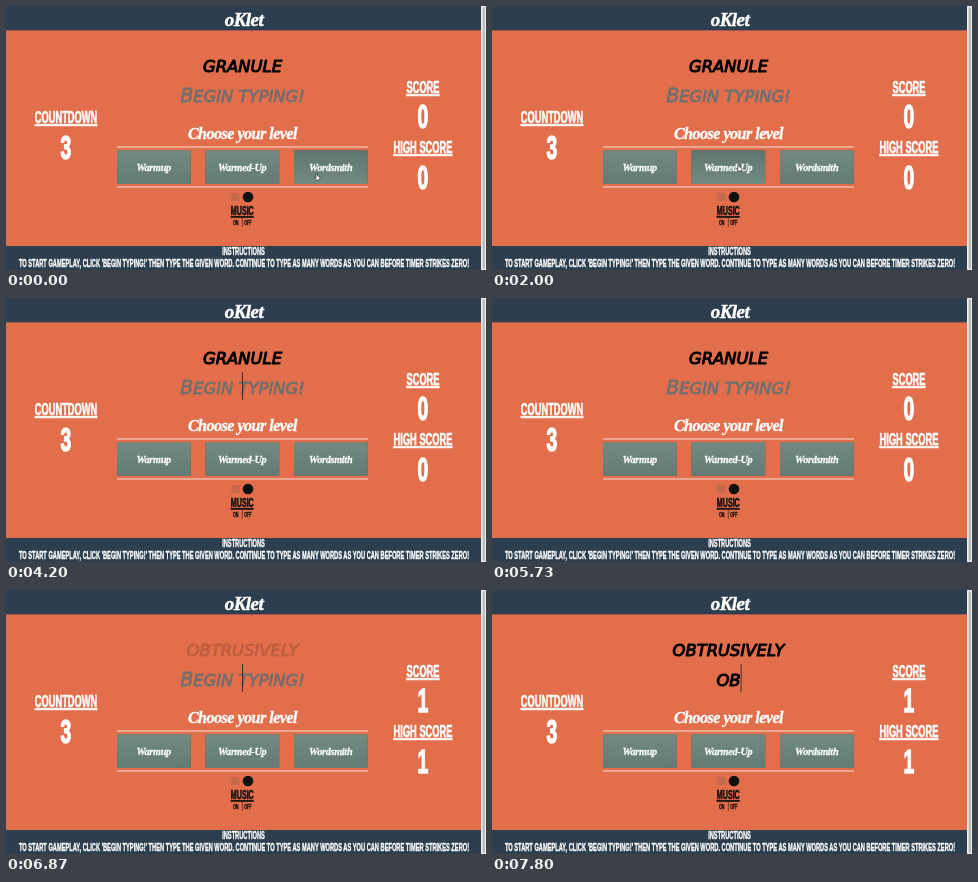
Animation of 480x264 px, one loop 8 s. Source, as an HTML page:

```html
<!DOCTYPE html>
<html lang="en">
<head>
<meta charset="utf-8">
<title>Typing game</title>
<style>
  html, body { margin: 0; width: 100%; height: 100%; overflow: hidden; background: #e36e4b; }
  svg { display: block; width: 100vw; height: 100vh; }
  text { text-anchor: middle; fill: #fff; stroke: #fff; }
  .caps { font-family: "Liberation Sans", Arial, sans-serif; font-weight: bold; stroke-width: .045em; }
  .script { font-family: "Liberation Serif", Times, serif; font-weight: bold; font-style: italic; letter-spacing: -.03em; stroke-width: .025em; }
  .marker { font: italic 16.4px "DejaVu Sans", sans-serif; fill: #000; stroke: #000; stroke-width: 1.05; stroke-linejoin: round; }
  .hint { fill: #716f6f; stroke: #716f6f; stroke-width: .8; }
  .under { text-decoration: underline; }
  .dark { fill: #0d0d0d; stroke: #0d0d0d; }
  .button { filter: drop-shadow(0 .6px .7px #0006); }
</style>
</head>
<body>
<svg id="stage" viewBox="0 0 480 264" preserveAspectRatio="none">
  <defs>
    <linearGradient id="idle" x2="0" y2="1">
      <stop stop-color="#728a80"/><stop offset="1" stop-color="#637b75"/>
    </linearGradient>
    <linearGradient id="hover" x2="0" y2="1">
      <stop stop-color="#5e7670"/><stop offset="1" stop-color="#728a80"/>
    </linearGradient>
  </defs>
  <rect width="480" height="264" fill="#e36e4b"/>
  <rect width="480" height="24.4" fill="#2d3e4e"/>
  <rect y="240" width="480" height="24" fill="#2d3e4e"/>
  <rect x="475" width="5" height="264" fill="#eeeeee"/>
  <rect x="476.500" y="1" width="2.500" height="262" rx="1.200" fill="#bdbdbd"/>
  <path d="M111 141h251M111 181h251" stroke="#f8ddd4"/>
  <rect x="225.5" y="187" width="8" height="8" fill="#c4694c"/>
  <circle cx="242" cy="191" r="5.3" fill="#111"/>
  <path d="M236.3 212v9" stroke="#3a241e" stroke-width=".7"/>
</svg>
<script>
const LOOP = 8000;
const CONDENSED = 0.57;
const CENTER = 236.5;
const stage = document.getElementById("stage");

function add(tag, attrs, content = "") {
  const node = document.createElementNS("http://www.w3.org/2000/svg", tag);
  for (const key in attrs) node.setAttribute(key, attrs[key]);
  node.textContent = content;
  stage.append(node);
  return node;
}
const caps = (content, x, y, size, style = "") => add("text", {
  class: "caps " + style, "font-size": size,
  transform: `translate(${x} ${y}) scale(${CONDENSED} 1)`
}, content);
const script = (content, x, y, size) =>
  add("text", { class: "script", x, y, "font-size": size }, content);
const marker = (y, style = "") =>
  add("text", { class: "marker " + style, x: CENTER, y });

script("oKlet", 238, 20, 19);
script("Choose your level", 236.5, 132.5, 16);

const buttons = [["Warmup", 111], ["Warmed-Up", 199.5], ["Wordsmith", 288]].map(([name, x]) => {
  const face = add("rect", { class: "button", x, y: 144.2, width: 73.7, height: 33.8, rx: 1 });
  script(name, x + 36.7, 164.5, 10.25);
  return { x, face };
});

caps("COUNTDOWN", 60, 117, 16.3, "under");
caps("SCORE", 417, 87, 16.3, "under");
caps("HIGH SCORE", 417, 147, 16.3, "under");
caps("MUSIC", 236.3, 209, 12.5, "under dark");
caps("ON", 229.6, 218.7, 6.4, "dark");
caps("OFF", 241.8, 218.7, 6.4, "dark");
caps("INSTRUCTIONS", 237.5, 248.5, 10);
caps("TO START GAMEPLAY, CLICK 'BEGIN TYPING!' THEN TYPE THE GIVEN WORD. CONTINUE TO TYPE AS MANY WORDS AS YOU CAN BEFORE TIMER STRIKES ZERO!", 238, 260.8, 10);

const countdown = caps("3", 60, 152.7, 34);
const score = caps("0", 417, 122.4, 34);
const highScore = caps("0", 417, 182.6, 34);

const word = marker(65.5);
const typed = marker(95.5);
const hint = marker(95.5, "hint");
hint.innerHTML = '<tspan font-size="19">B</tspan>EGIN TYPING!';
const caret = add("path", { d: "M0 74v28", stroke: "#3b302d" });
const hand = add("path", {
  d: "M-1 -3v4l-1.500 -1 1.500 3h3.500l.5 -3 -2.500 -1v-2z",
  fill: "#fff", stroke: "#222", "stroke-width": .6
});
const beam = add("path", { d: "M-1.500 -5h3M0 -5v10M-1.500 5h3", stroke: "#333", "stroke-width": .7 });

// Keys: [time, value]; holds the latest value.
const step = (keys, t) => keys.filter(([start]) => t >= start).pop()[1];
const swing = p => 0.5 - Math.cos(Math.PI * Math.min(1, Math.max(0, p))) / 2;

const timer = [[0, "3"], [130, "2"], [1870, "3"]];
const typing = [
  [0, ""], [5800, "G"], [5930, "GR"], [6070, "GRA"], [6130, "GRAN"],
  [6270, "GRANU"], [6470, "GRANUL"], [6670, ""], [7530, "O"], [7800, "OB"]
];
const blink = [
  [0, false], [4000, true], [4530, false], [4870, true], [5370, false],
  [5800, true], [7200, false], [7470, true]
];
const route = [[930, 311, 171], [1330, 281, 186], [1730, 247, 162], [3000, 247, 162], [3670, 236.5, 88]];

function pointerAt(t) {
  const next = route.findIndex(([time]) => time > t);
  if (next < 1) return (next ? route[route.length - 1] : route[0]).slice(1);
  const [t0, x0, y0] = route[next - 1], [t1, x1, y1] = route[next];
  const p = swing((t - t0) / (t1 - t0));
  return [x0 + (x1 - x0) * p, y0 + (y1 - y0) * p];
}
const show = (node, visible) => node.setAttribute("visibility", visible ? "visible" : "hidden");
const move = (node, x, y) => node.setAttribute("transform", `translate(${x} ${y})`);

function draw(t) {
  const solved = t >= 6670;
  const entry = step(typing, t);
  countdown.textContent = step(timer, t);
  score.textContent = highScore.textContent = solved ? "1" : "0";
  word.textContent = solved ? "OBTRUSIVELY" : "GRANULE";
  word.setAttribute("opacity", solved ? swing((t - 6670) / 800) : 1);
  typed.textContent = entry;
  show(hint, !entry);

  const end = entry ? typed.getComputedTextLength() / 2 + 0.5 : 0;
  move(caret, CENTER + end, 0);
  show(caret, step(blink, t));

  const [x, y] = pointerAt(t);
  const inField = y < 103;
  move(hand, x, y);
  move(beam, x, y);
  show(hand, t < 4000 && !inField);
  show(beam, t < 4000 && inField);
  for (const { x: left, face } of buttons) {
    const hovered = x > left && x < left + 74 && y > 144 && y < 178;
    face.setAttribute("fill", hovered ? "url(#hover)" : "url(#idle)");
  }
}

function frame(now) {
  draw(now % LOOP);
  requestAnimationFrame(frame);
}
draw(0);
requestAnimationFrame(frame);
</script>
</body>
</html>
```
